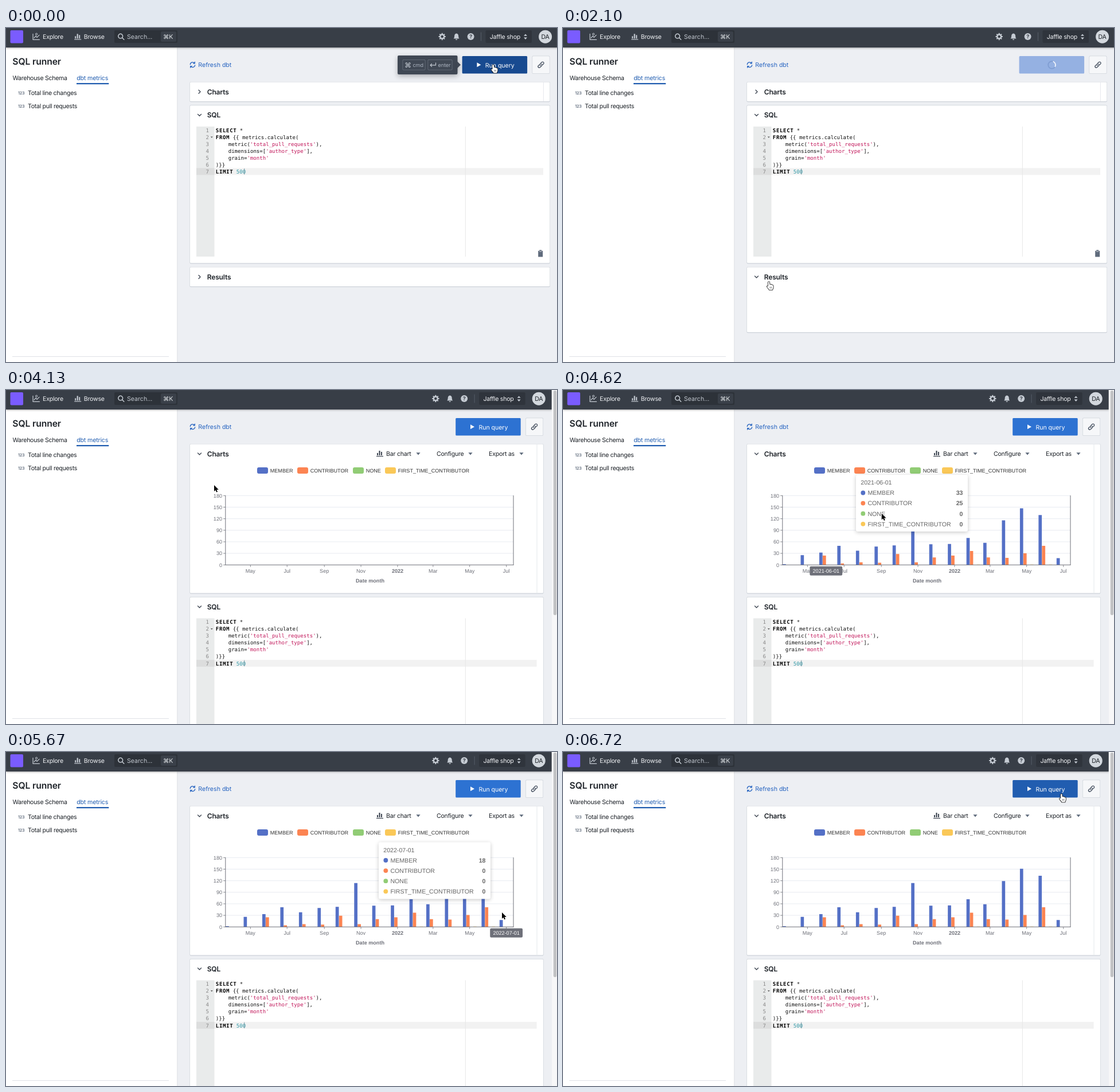
Animation of 961 by 583 pixels, one loop 6.79 s. Source, as an HTML page with a canvas:

```html
<!DOCTYPE html>
<html lang="en">
<head>
<meta charset="utf-8">
<title>SQL runner</title>
<style>
html,body{margin:0;width:100%;height:100%;overflow:hidden;background:#edeff3}
canvas{display:block;width:961px;height:583px}
</style>
</head>
<body>
<canvas id="stage"></canvas>
<script>
const W = 961, H = 583, LOOP = 6790, STEP = 70;
const canvas = document.getElementById('stage');
const dpr = window.devicePixelRatio || 1;
canvas.width = Math.round(W * dpr);
canvas.height = Math.round(H * dpr);
const c = canvas.getContext('2d');
c.textRendering = 'geometricPrecision';

const UI = 'Inter, sans-serif';
const ARIAL = '"Liberation Sans", Arial, sans-serif';
const MONO = '"DejaVu Sans Mono", monospace';
const INK = '#1c2127', GRAY = '#5f6b7c', AXIS = '#6e7079', NAVTEXT = '#f0f2f5', NAVICON = '#c5cbd3';

const clamp = v => Math.max(0, Math.min(1, v));
const ease = v => { v = clamp(v); return v * v * (3 - 2 * v); };
const inside = (p, x0, y0, x1, y1) => p.x >= x0 && p.x < x1 && p.y >= y0 && p.y < y1;

// keys: [time, x, y]
function along(keys, t) {
  if (t <= keys[0][0]) return {x: keys[0][1], y: keys[0][2]};
  for (let i = 1; i < keys.length; i++) {
    const a = keys[i - 1], b = keys[i];
    if (t <= b[0]) {
      const k = (t - a[0]) / (b[0] - a[0]);
      return {x: a[1] + (b[1] - a[1]) * k, y: a[2] + (b[2] - a[2]) * k};
    }
  }
  const l = keys[keys.length - 1];
  return {x: l[1], y: l[2]};
}

const POINTER = [
  [280, 850, 65], [700, 600, 225], [1190, 371.5, 393], [1400, 342, 431], [1960, 342, 433],
  [2590, 419.5, 481], [3010, 419.5, 481], [3570, 341, 110], [3780, 341, 110], [4130, 363, 166],
  [4410, 395, 195], [4900, 770, 243], [5040, 800, 240], [5400, 862, 275], [5670, 865, 280],
  [6230, 866, 283], [6440, 867, 178], [6720, 869.5, 74]
];
const TIP = [
  [4480, 425, 148], [4830, 640, 148], [5040, 573, 147.5], [5670, 650, 157.5], [6500, 651, 157.5]
];

// drawing helpers; y is the middle of the capitals
function text(s, x, y, o = {}) {
  const size = o.size || 10.6;
  c.font = `${o.weight || 400} ${size}px ${o.font || UI}`;
  c.letterSpacing = (o.gap ?? (o.font ? 0 : -0.24)) + 'px';
  c.textAlign = o.align || 'left';
  c.textBaseline = 'alphabetic';
  c.fillStyle = o.color || INK;
  c.fillText(s, x, y + size * 0.36);
}
function rect(x, y, w, h, fill, r = 0) {
  c.fillStyle = fill;
  c.beginPath();
  c.roundRect(x, y, w, h, r);
  c.fill();
}
function line(x0, y0, x1, y1, color, w = 1) {
  c.strokeStyle = color;
  c.lineWidth = w;
  c.beginPath();
  c.moveTo(x0, y0);
  c.lineTo(x1, y1);
  c.stroke();
}
function circle(x, y, r, fill) {
  c.fillStyle = fill;
  c.beginPath();
  c.arc(x, y, r, 0, 7);
  c.fill();
}
function shape(d, x, y, fill, stroke, w = 1) {
  const p = new Path2D(d);
  c.save();
  c.translate(x, y);
  c.lineJoin = c.lineCap = 'round';
  if (stroke) { c.strokeStyle = stroke; c.lineWidth = w; c.stroke(p); }
  if (fill) { c.fillStyle = fill; c.fill(p); }
  c.restore();
}
function clipped(x, y, w, h, draw) {
  c.save();
  c.beginPath();
  c.rect(x, y, w, h);
  c.clip();
  draw();
  c.restore();
}
function shadowed(blur, dy, color, draw) {
  c.save();
  c.shadowBlur = blur * dpr;
  c.shadowOffsetY = dy * dpr;
  c.shadowColor = color;
  draw();
  c.restore();
}
function card(x, y, w, h) {
  rect(x - .6, y - .6, w + 1.2, h + 1.8, '#cdd2d9', 2);
  rect(x, y, w, h, '#fff', 1.5);
}
function chevron(x, y, open) {
  shape(open ? 'M-3-1.4L0 1.6 3-1.4' : 'M-1.5-3L1.5 0-1.5 3', x, y, null, '#404854', 1.4);
}
function header(name, y, open) {
  chevron(337.5, y, open);
  text(name, 350.7, y, {size: 12, weight: 600, gap: -.15});
}
function barsIcon(x, y, color) {
  rect(x - 5, y - 1, 2, 4, color);
  rect(x - 1.6, y - 5, 2.2, 8, color);
  rect(x + 2, y - 3, 2, 6, color);
  line(x - 6, y + 4.6, x + 6, y + 4.6, color, 1.2);
}

// chart data
const DAY = 864e5, START = Date.UTC(2021, 4, 1);
const member = [2, 26, 33, 51, 38, 49, 52, 114, 55, 56, 72, 59, 119, 151, 133, 18];
const contrib = [0, 0, 25, 4, 7, 6, 29, 7, 20, 25, 37, 20, 19, 31, 51, 0];
const first = member.map((_, i) => [10, 13, 14].includes(i) ? 1 : 0);
const none = member.map(() => 0);
const SERIES = [
  ['MEMBER', '#5470c6', member, 438], ['CONTRIBUTOR', '#fc8452', contrib, 508],
  ['NONE', '#91cc75', none, 605], ['FIRST_TIME_CONTRIBUTOR', '#fac858', first, 661]
];
const MONTHS = member.map((_, i) => {
  const d = Date.UTC(2021, 3 + i, 1);
  return {x: 426.3 + (d - START) / DAY * 1.0477, date: new Date(d).toISOString().slice(0, 10)};
});
const BASE = 305.3, UNIT = 0.672;
const barLeft = (i, s) => MONTHS[i].x - 11.8 + s * 6;

function overBar(p) {
  return SERIES.some((s, k) => s[2].some((v, i) =>
    v && inside(p, barLeft(i, k), BASE - v * UNIT, barLeft(i, k) + 5.7, BASE)));
}

function chart(t) {
  barsIcon(652, 111, '#404854');
  [['Bar chart', 663, 719], ['Configure', 751, 810], ['Export as', 842, 899]].forEach(([s, x, a]) => {
    text(s, x, 111.3);
    shape('M-3.6-2H3.6L0 2.3Z', a, 111.3, GRAY);
  });
  for (const [name, color, , x] of SERIES) {
    rect(x, 135, 19, 11, color, 3);
    text(name, x + 22.7, 140.8, {size: 9.08, font: ARIAL, color: '#333'});
  }
  for (let v = 0; v <= 180; v += 30) {
    const y = BASE - v * UNIT;
    if (v) line(383, y, 885, y, '#e2e6ee', .8);
    line(379, y, 383, y, AXIS, .8);
    text(v, 377, y, {size: 9.08, font: ARIAL, color: AXIS, align: 'right'});
  }
  const grow = 1 - Math.pow(1 - clamp((t - 4130) / 700), 3);
  clipped(383, 180, 502, 126, () => SERIES.forEach(([, color, data], k) => data.forEach((v, i) => {
    const h = v * UNIT * grow;
    if (h) rect(barLeft(i, k), BASE - h, 5.7, h, color);
  })));
  line(382.8, 184, 382.8, 305.5, AXIS, 1);
  line(885, 184, 885, 305.5, AXIS, 1);
  line(382.5, BASE, 885.5, BASE, AXIS, 1);
  ['May', 'Jul', 'Sep', 'Nov', '2022', 'Mar', 'May', 'Jul'].forEach((s, i) => {
    const x = MONTHS[1 + 2 * i].x;
    line(x, BASE, x, 309, AXIS, .8);
    text(s, x, 316.2, {size: 9.08, font: ARIAL, color: AXIS, align: 'center', weight: i === 4 ? 700 : 400});
  });
  text('Date month', 635, 332.8, {size: 9.08, font: ARIAL, color: AXIS, align: 'center', weight: 700});
}

function tooltip(t) {
  if (t < 4480 || t > 6620) return;
  const px = along(POINTER, Math.min(t, 6300) - 140).x;
  let i = 0;
  MONTHS.forEach((m, k) => { if (Math.abs(m.x - px) < Math.abs(MONTHS[i].x - px)) i = k; });
  const {x, date} = MONTHS[i], p = along(TIP, t);
  if (t < 6420) {
    rect(x - 28.4, 307.8, 56.8, 16, AXIS, 2);
    text(date, x, 316, {size: 9.08, font: ARIAL, color: '#fff', align: 'center'});
  }
  c.globalAlpha = clamp((t - 4410) / 140) * clamp((6640 - t) / 160);
  shadowed(7, 1.5, 'rgba(0,0,0,.22)', () => rect(p.x, p.y, 195, 99, '#fff', 3));
  text(date, p.x + 8.3, p.y + 13.5, {font: ARIAL, color: '#666'});
  SERIES.forEach(([name, color, data], k) => {
    const y = p.y + 31.5 + k * 18.1;
    circle(p.x + 12.3, y, 3.9, color);
    text(name, p.x + 20.4, y, {font: ARIAL, color: '#666'});
    text(data[i], p.x + 186.5, y, {font: ARIAL, color: '#666', weight: 700, align: 'right'});
  });
  c.globalAlpha = 1;
}

const RED = '#c2185b', TEAL = '#2f97a5', CODE = '#111';
const LINES = [
  [['SELECT', 1], [' *', CODE]],
  [['FROM', 1], [' {{ metrics.calculate(', CODE]],
  [['    metric(', CODE], ["'total_pull_requests'", RED], ['),', CODE]],
  [['    dimensions=[', CODE], ["'author_type'", RED], ['],', CODE]],
  [['    grain=', CODE], ["'month'", RED]],
  [[')}}', CODE]],
  [['LIMIT', 1], [' 500', TEAL]]
];
function editor(y, right) {
  rect(332, y, 31.5, 227, '#e9ebeb');
  rect(363.5, y + 72.5, right - 363.5, 12, '#f2f2f2');
  rect(332, y + 72.5, 31.5, 12, '#dcdddd');
  line(801.3, y, 801.3, y + 227, '#e6e6e6');
  LINES.forEach((parts, i) => {
    const ly = y + 6.3 + i * 12.08;
    text(i + 1, 354, ly, {size: 9.08, font: MONO, color: '#888', align: 'right'});
    let x = 365.8;
    for (const [s, color] of parts) {
      const bold = color === 1;
      text(s, x, ly, {size: 9.08, font: MONO, color: bold ? '#000' : color, weight: bold ? 700 : 400, gap: bold ? .62 : 0});
      x += s.length * (bold ? 6.09 : 5.46);
    }
  });
  shape('M-2-1H2L0 1.5Z', 358.8, y + 18.5, '#666');
  line(415.7, y + 73, 415.7, y + 84, '#6a8f99', .8);
  shape('M-4-4.5H-2V-6H2V-4.5H4V6H-4Z', right - 4.8, y + 221.5, GRAY);
  line(right - 7, y + 218, right - 2.6, y + 218, '#fff', .8);
}

function table(y, right, p) {
  const cols = [375, 577.6, 780.6];
  rect(332.5, y, right - 332.5, 23, '#c5cbd3');
  [['#', 341], ['Date month', 383], ['Author type', 586], ['Total pull requests', 789]].forEach(([s, x]) =>
    text(s, x, y + 11.3, {weight: 600}));
  const types = ['MEMBER', 'CONTRIBUTOR', 'NONE'];
  for (let i = 0; i < 6; i++) {
    const ry = y + 23 + i * 22.65, month = i < 3 ? 4 : 5;
    const hover = inside(p, 332, ry, right, ry + 22.65);
    rect(332.5, ry, right - 332.5, 22.65, hover ? '#e5e8ec' : i % 2 ? '#f6f7f9' : '#fff');
    line(332.5, ry + 22.4, right, ry + 22.4, '#dcdfe4', .8);
    text(i + 1, 341, ry + 11.3);
    text(`2021-0${month}-01T00:00:00.000Z`, 383, ry + 11.3, {gap: -.12});
    text(types[i % 3], 586, ry + 11.3);
    text(i === 0 ? 2 : i === 3 ? 26 : 0, right - 8.5, ry + 11.3, {align: 'right'});
  }
  [332.5, ...cols, right].forEach(x => line(x, y, x, H, '#d5d9df', .8));
  cols.forEach(x => line(x, y, x, y + 23, '#b3bac4', .8));
}

function nav(dx) {
  shadowed(3, 1, 'rgba(0,0,0,.35)', () => rect(0, 0, W + dx + 2, 34, '#383e47'));
  rect(7.5, 4, 22.5, 22.5, '#7a5cff', 2);
  shape('M-5.5-5V5H6M-3.5 2L-.5-1.5 1.5 1 5.5-3', 52.5, 15.3, null, NAVICON, 1.2);
  shape('M-2.5-3.8a1.6 1.6 0 1 0 3.2 0a1.6 1.6 0 1 0 -3.2 0', 54, 14.5, null, NAVICON, 1);
  text('Explore', 64, 15.4, {color: NAVTEXT});
  barsIcon(125.2, 15.3, NAVICON);
  text('Browse', 135.8, 15.4, {color: NAVTEXT});
  rect(189, 4, 110, 22, '#2d3239', 2);
  rect(270, 6, 27, 18, '#3a4049', 2);
  shape('M3.6 0A3.9 3.9 0 1 1-4.2 0A3.9 3.9 0 1 1 3.6 0M2.6 2.8L5.8 6', 200, 14.2, null, NAVICON, 1.5);
  text('Search...', 211, 15.4, {color: '#c0c6ce', gap: 0});
  text('⌘K', 274, 15.4, {color: '#e5e8eb'});

  const gx = 760.7 + dx;
  c.strokeStyle = NAVICON;
  c.lineWidth = 2.4;
  c.beginPath();
  c.arc(gx, 15, 3.5, 0, 7);
  c.stroke();
  for (let a = 0; a < 8; a++) {
    const u = Math.cos(a * Math.PI / 4), v = Math.sin(a * Math.PI / 4);
    line(gx + u * 4, 15 + v * 4, gx + u * 6.2, 15 + v * 6.2, NAVICON, 2);
  }
  shape('M-5 3.5Q-3.5 2-3.5-1Q-3.5-5 0-5.5Q3.5-5 3.5-1Q3.5 2 5 3.5ZM-1.7 4.5H1.7Q1.3 6 0 6T-1.7 4.5Z', 785.6 + dx, 15, NAVICON);
  circle(810.6 + dx, 15, 6, NAVICON);
  text('?', 810.7 + dx, 15.2, {size: 9, weight: 700, color: '#383e47', align: 'center', gap: 0});
  line(828.5 + dx, 7.5, 828.5 + dx, 22.5, '#565d68');
  rect(836.5 + dx, 4, 80.5, 22, '#2f343c', 2);
  text('Jaffle shop', 843.8 + dx, 15.4, {color: NAVTEXT});
  shape('M-3-1.4L0-4.8 3-1.4ZM-3 1.4L0 4.8 3 1.4Z', 906 + dx, 15.2, NAVICON);
  circle(940.6 + dx, 15.2, 11.5, '#d3d8de');
  text('DA', 940.6 + dx, 15.4, {align: 'center'});
}

function sidebar() {
  shadowed(2, 0, 'rgba(17,20,24,.25)', () => rect(0, 34, 298.3, H, '#fff'));
  text('SQL runner', 11.3, 58.5, {size: 15.7, weight: 600, gap: -.1});
  text('Warehouse Schema', 11.5, 87.2, {gap: -.3});
  text('dbt metrics', 123.2, 87.2, {color: '#215db0', gap: -.15});
  rect(123, 96, 56.3, 2.2, '#215db0');
  ['Total line changes', 'Total pull requests'].forEach((s, i) => {
    const y = 113.5 + i * 22.6;
    text('123', 21, y, {size: 7.2, weight: 600, color: GRAY, gap: -.2});
    text(s, 38, y, {gap: -.3});
  });
  line(11, 573.5, 284, 573.5, '#dfe2e7');
}

function toolbar(t, dx, p) {
  const blue = '#2563c0';
  shape('M-4.2-.6A4.2 4.2 0 0 1 3.4-2.6M4.2.6A4.2 4.2 0 0 1-3.4 2.6M3.8-5V-2.4H1.2M-3.8 5V2.4H-1.2', 325.5, 64.2, null, blue, 1.3);
  text('Refresh dbt', 335.3, 64.5, {color: blue, gap: 0});

  const x = 795.6 + dx, busy = t >= 140 && t < 2240;
  const hover = inside(p, x, 49, x + 113.5, 79.5);
  rect(x, 49, 113.5, 30.5, busy ? '#95b1e2' : t < 140 ? '#184a90' : hover ? '#215db0' : '#2d72d2', 1.5);
  if (busy) {
    const a = (t - 1190) / 500 * Math.PI * 2;
    c.lineCap = 'round';
    c.lineWidth = 1.8;
    c.strokeStyle = '#7f9dd2';
    c.beginPath();
    c.arc(x + 57, 64.5, 6.4, 0, 7);
    c.stroke();
    c.strokeStyle = '#f4f7fc';
    c.beginPath();
    c.arc(x + 57, 64.5, 6.4, a, a + Math.PI / 2);
    c.stroke();
    c.lineCap = 'butt';
  } else {
    shape('M-3-4L4 0-3 4Z', x + 28.8, 64.3, '#fff');
    text('Run query', x + 40.2, 64.8, {color: '#fff', gap: -.05});
  }
  rect(917.5 + dx, 48.5, 31, 31.5, '#cfd4db', 2);
  rect(918.2 + dx, 49.2, 29.6, 30, '#f6f7f9', 1.5);
  shape('M-1 1.2Q-2.6-.4-1-2L1.6-4.6Q3-5.6 4.4-4.4T4.6-1.6L3.2-.2M1-1.2Q2.6.4 1 2L-1.6 4.6Q-3 5.6-4.4 4.4T-4.6 1.6L-3.2.2', 933 + dx, 64.2, null, '#4d5766', 1.4);

  const alpha = clamp((280 - t) / 140);
  if (!alpha) return;
  c.globalAlpha = alpha;
  shadowed(8, 3, 'rgba(17,20,24,.3)', () => {
    rect(683, 48, 104.5, 33, '#404854', 2);
    shape('M0-6L6 0 0 6Z', 787, 64.3, '#404854');
  });
  [[692, 40], [736, 43]].forEach(([bx, w]) => {
    rect(bx - .5, 55, w, 18.5, '#69717d', 2);
    rect(bx + .3, 55.8, w - 1.6, 16.9, '#404854', 1.5);
  });
  const key = {size: 9.1, color: '#abb3bf', gap: -.1};
  text('⌘', 695, 64.3, {size: 12, color: '#c5cbd3', gap: 0});
  text('cmd', 709.5, 64.5, key);
  shape('M5-3.5V.5H-4.5M-2-2L-4.5.5-2 3', 744.5, 64.3, null, '#c5cbd3', 1.2);
  text('enter', 753.5, 64.5, key);
  c.globalAlpha = 1;
}

function pointer(p, kind) {
  if (kind === 'beam') {
    const d = 'M-2.5-6Q0-6 0-4.5Q0-6 2.5-6M0-4.5V4.5M-2.5 6Q0 6 0 4.5Q0 6 2.5 6';
    shape(d, p.x, p.y, null, 'rgba(255,255,255,.8)', 2.2);
    shape(d, p.x, p.y, null, '#111', 1);
  } else if (kind === 'hand') {
    shape('M-1.5 7V.6A1.3 1.3 0 0 1 1.1.6V4Q3.2 3.4 3.5 4.5Q5.4 4.2 5.7 5.2Q7.4 5 7.4 6.5V9Q7.4 11 6.2 12.3V13.4H.2V12.6Q-1.8 10.6-3.4 8Q-3.8 6.2-1.5 7Z', p.x, p.y, '#fff', '#111', 1.6);
    line(p.x + 2, p.y + 8, p.x + 2, p.y + 11, '#333', .7);
    line(p.x + 4.2, p.y + 8, p.x + 4.2, p.y + 11, '#333', .7);
  } else {
    shape('M0 0V11L2.5 8.7 4.2 12.4 6 11.6 4.4 8H7.8Z', p.x, p.y, '#000', '#fff', 1.6);
  }
}

function draw(t) {
  c.setTransform(dpr, 0, 0, dpr, 0, 0);
  const p = along(POINTER, t);
  const loaded = t >= 2240;
  const dx = loaded ? -11.4 : 0;
  const edge = 948.4 + dx, right = 937 + dx;
  const open = ease((t - 3710) / 200), drop = 226.5 * open;
  rect(0, 0, W, H, '#edeff3');
  sidebar();

  const ch = 33.5 + drop;
  card(321, 94.6, edge - 321, ch);
  line(right + .4, 95, right + .4, 94.6 + ch, '#e5e8ec');
  header('Charts', 111.3, open > 0);
  if (open) clipped(321, 94.6, edge - 321, ch, () => chart(t));

  card(321, 135.2 + drop, edge - 321, 275);
  header('SQL', 152 + drop, true);
  editor(172 + drop, right);

  const ry = 417.6 + drop, shown = ease((t - 1470) / 200);
  card(321, ry, edge - 321, loaded ? H : 33.5 + 80 * shown);
  header('Results', ry + 16.8, shown > 0);
  if (loaded) table(ry + 37.4, right, p);

  toolbar(t, dx, p);
  nav(dx);
  if (loaded) {
    rect(952, 0, 9, H, '#f7f7f8');
    rect(954.8, 1, 5.4, 507 - 115 * open, '#c1c2c4', 2.7);
  }
  if (open === 1) tooltip(t);

  const button = inside(p, 795.6 + dx, 49, 909 + dx, 79.5);
  const title = inside(p, 321, 95, edge, 128) || inside(p, 321, ry, edge, ry + 34);
  const overText = inside(p, 364, 172 + drop, right, 399 + drop) || loaded && inside(p, 332, ry + 37, right, H);
  const bar = open === 1 && t > 4480 && overBar(p);
  pointer(p, button || title || bar ? 'hand' : overText ? 'beam' : 'arrow');
}

const begin = performance.now();
function tick() {
  const t = (performance.now() - begin) % LOOP;
  draw(Math.floor(t / STEP) * STEP);
  requestAnimationFrame(tick);
}
draw(0);
requestAnimationFrame(tick);
</script>
</body>
</html>
```
